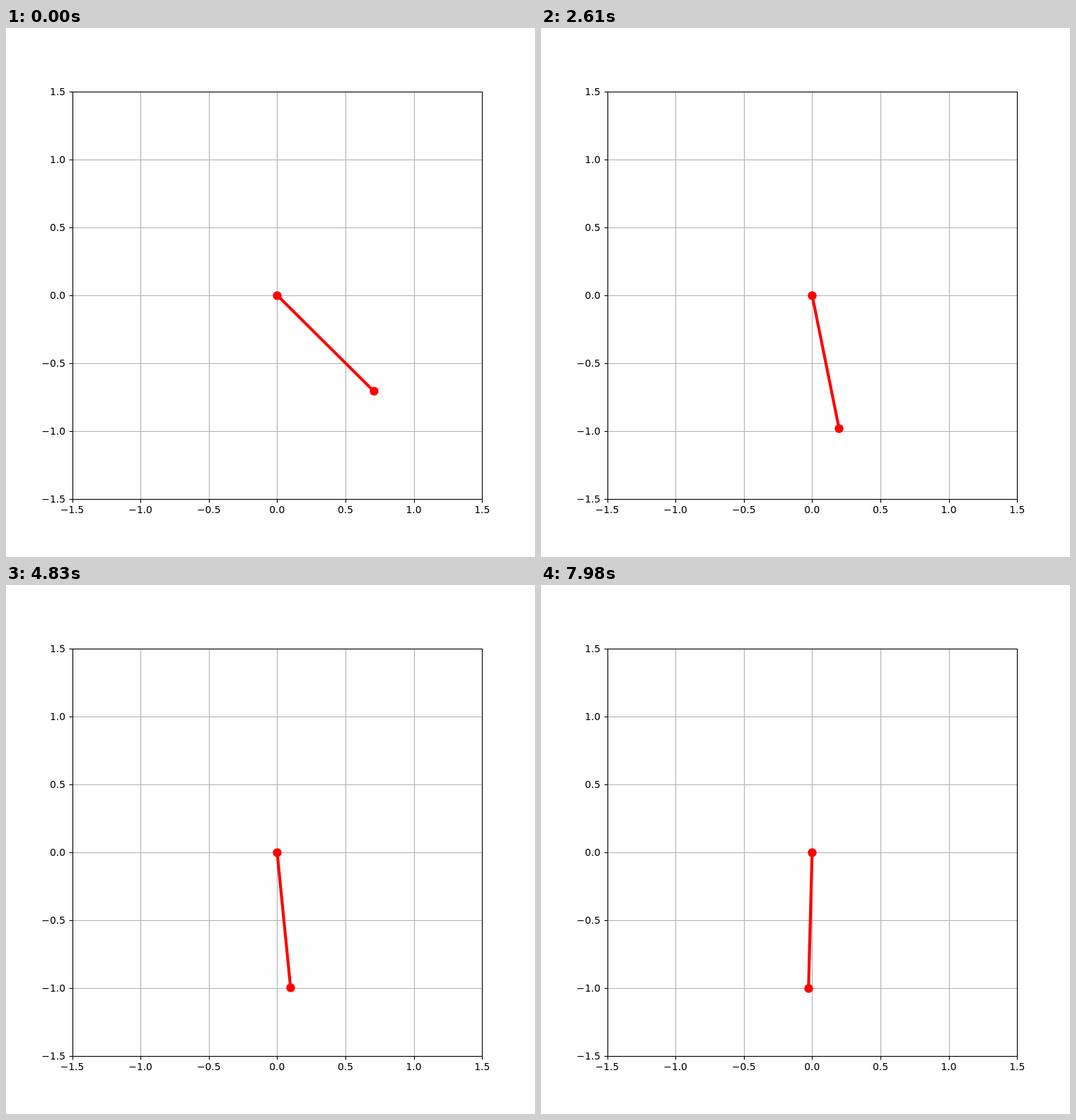
Recreate the animation shown at these times as an HTML page. Size 748 by 748 pixels, loop 8 s.

```html
<!DOCTYPE html>
<html lang="en">
<head>
<meta charset="utf-8">
<title>Damped pendulum</title>
<style>
  html, body { margin: 0; width: 100%; height: 100%; overflow: hidden; background: #fefefe; }
  svg { display: block; width: 748px; height: 748px; }
  text { font: 13.89px "DejaVu Sans", sans-serif; fill: #000; }
</style>
</head>
<body>
<svg id="stage" viewBox="0 0 748 748">
  <g id="grid" stroke="#b0b0b0" stroke-width="1.11"></g>
  <g id="ticks" stroke="#000" stroke-width="1.11"></g>
  <g id="labels"></g>
  <g fill="#f00">
    <line id="rod" stroke="#f00" stroke-width="4.17" stroke-linecap="square"/>
    <circle id="pivot" r="6.25"/>
    <circle id="bob" r="6.25"/>
  </g>
  <rect id="frame" fill="none" stroke="#000" stroke-width="1.11"/>
</svg>
<script>
const SIZE = 748, LOOP = 8000, STEP = 30;
const GRAVITY = 9.81, DAMPING = 0.5, DT = 0.05, SUBSTEPS = 10;

const byId = id => document.getElementById(id);
const setAttrs = (el, attrs) => {
  for (const key in attrs) el.setAttribute(key, attrs[key]);
  return el;
};
const add = (parent, tag, attrs) =>
  parent.appendChild(setAttrs(document.createElementNS("http://www.w3.org/2000/svg", tag), attrs));

// Plot coordinates, -1.5 to 1.5 on both axes
const toX = v => SIZE * (0.125 + 0.775 * (v + 1.5) / 3);
const toY = v => SIZE * (0.89 - 0.77 * (v + 1.5) / 3);
const snap = p => Math.floor(p + 0.5) + 0.5;

function drawAxes() {
  const grid = byId("grid"), ticks = byId("ticks"), labels = byId("labels");
  const left = snap(toX(-1.5)), right = snap(toX(1.5));
  const top = snap(toY(1.5)), bottom = snap(toY(-1.5));
  for (let i = -3; i <= 3; i++) {
    const v = i / 2, x = snap(toX(v)), y = snap(toY(v));
    const label = (v < 0 ? "\u2212" : "") + Math.abs(v).toFixed(1);
    add(grid, "line", { x1: x, x2: x, y1: top, y2: bottom });
    add(grid, "line", { x1: left, x2: right, y1: y, y2: y });
    add(ticks, "line", { x1: x, x2: x, y1: bottom, y2: bottom + 4.86 });
    add(ticks, "line", { x1: left - 4.86, x2: left, y1: y, y2: y });
    add(labels, "text", { x: toX(v), y: 686, "text-anchor": "middle" }).textContent = label;
    add(labels, "text", { x: 84, y: y + 4.5, "text-anchor": "end" }).textContent = label;
  }
  setAttrs(byId("frame"), { x: left, y: top, width: right - left, height: bottom - top });
}

// Pendulum angles, one per step, integrated with the Runge-Kutta method
function swing(count) {
  const accel = (a, w) => -GRAVITY * Math.sin(a) - DAMPING * w;
  const h = DT / SUBSTEPS, angles = [];
  let a = Math.PI / 4, w = 0;
  for (let i = 0; i < count; i++) {
    angles.push(a);
    for (let j = 0; j < SUBSTEPS; j++) {
      const k1 = accel(a, w);
      const w2 = w + h / 2 * k1, k2 = accel(a + h / 2 * w, w2);
      const w3 = w + h / 2 * k2, k3 = accel(a + h / 2 * w2, w3);
      const w4 = w + h * k3, k4 = accel(a + h * w3, w4);
      a += h / 6 * (w + 2 * w2 + 2 * w3 + w4);
      w += h / 6 * (k1 + 2 * k2 + 2 * k3 + k4);
    }
  }
  return angles;
}

const angles = swing(Math.ceil(LOOP / STEP));
const rod = byId("rod"), bob = byId("bob");

function render(time) {
  const angle = angles[Math.floor((time % LOOP) / STEP)];
  const x = toX(Math.sin(angle)), y = toY(-Math.cos(angle));
  setAttrs(rod, { x2: x, y2: y });
  setAttrs(bob, { cx: snap(x), cy: snap(y) });
}

drawAxes();
setAttrs(rod, { x1: toX(0), y1: toY(0) });
setAttrs(byId("pivot"), { cx: snap(toX(0)), cy: snap(toY(0)) });
render(0);

const start = performance.now();
function tick() {
  render(performance.now() - start);
  requestAnimationFrame(tick);
}
requestAnimationFrame(tick);
</script>
</body>
</html>
```
